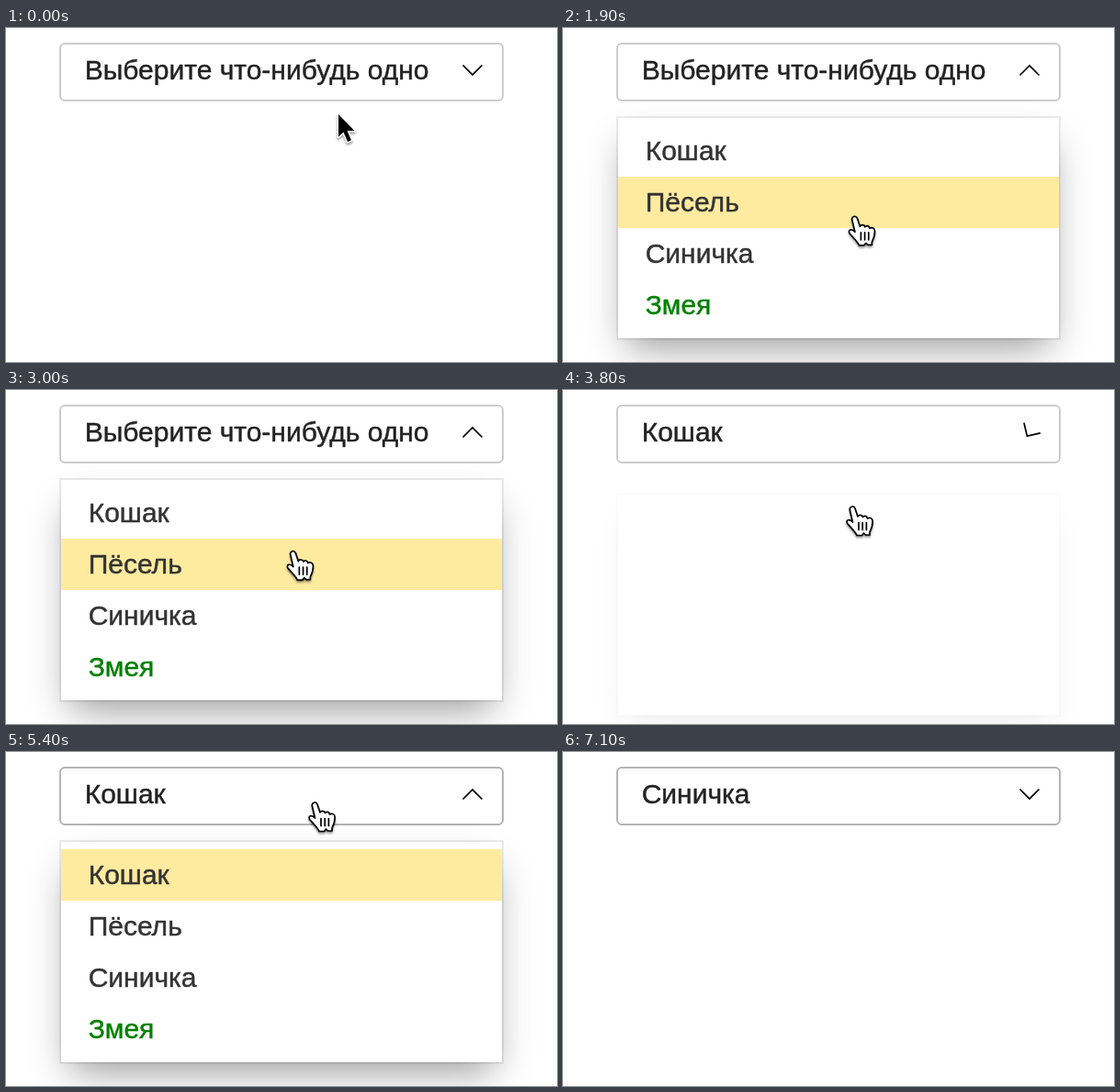
An HTML page for the animation above (8.7 s loop, 600x364 px).

```html
<!DOCTYPE html>
<html lang="ru">
<head>
<meta charset="utf-8">
<title>Выпадающий список</title>
<style>
html, body { margin: 0; width: 100%; height: 100%; overflow: hidden; background: #fff; }
#stage { position: relative; width: 600px; height: 364px; overflow: hidden; background: #fff; }
svg { position: absolute; left: 0; top: 0; overflow: hidden; }
text {
  font: 30px "Liberation Sans", Arial, sans-serif; white-space: pre;
  stroke: currentColor; fill: currentColor; stroke-width: .45px;
}
#menu {
  position: absolute; left: 60px; top: 98px; width: 480px; height: 240px; background: #fff;
  box-shadow: 0 0 0 2px rgba(0,0,0,.08), 0 20px 40px -10px rgba(0,0,0,.4);
}
#cursor { filter: drop-shadow(0 2px 1.2px rgba(0,0,0,.4)); }
</style>
</head>
<body>
<div id="stage">
  <svg width="600" height="364">
    <rect id="field" x="59" y="17" width="482" height="62" rx="5" fill="#fff" stroke-width="2"/>
    <text id="value" x="85.7" y="56" color="#222"></text>
    <polyline id="tick" points="497.5,40.5 508,51 518.5,40.5" fill="none" stroke="#000" stroke-width="1.7"/>
  </svg>
  <div id="menu">
    <svg id="items" width="480" height="240"></svg>
  </div>
  <svg width="600" height="364">
    <g id="cursor">
      <path id="arrow" d="M1 0V24.5L6.5 19.5L11 30L15 28.3L10.6 18H18.5Z"
        fill="#000" stroke="#fff" stroke-width="3" paint-order="stroke" stroke-linejoin="round"/>
      <g id="hand" stroke="#000" stroke-width="1.7" stroke-linejoin="round" stroke-linecap="round">
        <path fill="#fff" d="M-3.6 4C-4.5 0 .5 -1.5 2 2L5 11C6 8.5 10 9 10.5 11.5C12 9.5 15 10 15.5 13
          C17.5 11.5 21 12.5 21 15.5C21.5 20 20 24 18 28V31H13.5L11.5 29L9.5 31.5H4
          C3 28.5 -1 24.5 -6 19C-9 14.5 -4 13 -.5 17Z"/>
        <path fill="none" d="M6 17.5v8M10.2 17.5v8M14.4 17.5v8"/>
      </g>
    </g>
  </svg>
</div>
<script>
const LOOP = 8700, FRAME = 100, ROW = 56, FADE = 160;
const $ = id => document.getElementById(id);
const names = ['Кошак', 'Пёсель', 'Синичка', 'Змея'];

$('items').innerHTML = names.map((name, i) => {
  const color = name === 'Змея' ? '#008000' : '#333';
  return `<rect y="${8 + i * ROW}" width="480" height="${ROW}"/>` +
    `<text x="29.7" y="${46 + i * ROW}" style="color:${color}">${name}</text>`;
}).join('');
$('value').style.color = '#222';
const rows = [...$('items').querySelectorAll('rect')];
const labels = [...$('items').querySelectorAll('text')];

const clamp = v => Math.min(1, Math.max(0, v));
const easeOut = (p, power) => 1 - (1 - clamp(p)) ** power;

// The pointer glides from one stop to the next
const home = { x: 361, y: 94 };
const moves = [
  { start: 0, end: 300, x: 337, y: 56, power: 1.3 },
  { start: 1600, end: 2400, x: 306.5, y: 301, power: 2 },
  { start: 2500, end: 3300, x: 316, y: 127, power: 1.3 },
  { start: 4300, end: 4900, x: 337, y: 55, power: 1.3 }
];

function pointer(t) {
  let { x, y } = home;
  for (const m of moves) {
    const p = easeOut((t - m.start) / (m.end - m.start), m.power);
    x += (m.x - x) * p;
    y += (m.y - y) * p;
  }
  return { x, y };
}

// The menu opens and closes in turn
const toggles = [720, 3720, 5180, 6920];

function popup(t) {
  let open = 0, opening = false;
  toggles.forEach((start, i) => {
    if (t < start) return;
    opening = i % 2 === 0;
    const p = easeOut((t - start) / FADE, 2.5);
    open = opening ? p : 1 - p;
  });
  return { open, opening };
}

// Mouse picks the row first, arrow keys on the second visit
function activeRow(t, y) {
  if (t >= 5200) return t < 6000 ? 0 : t < 6200 ? 1 : 2;
  return Math.floor((y - 106) / ROW);
}

function draw(t) {
  const { x, y } = pointer(t);
  const { open, opening } = popup(t);
  const overField = y < 80;
  const chosen = t < 3800 ? -1 : t < 7000 ? 0 : 2;
  const active = activeRow(t, y);

  $('field').setAttribute('stroke', overField ? '#b3b3b3' : '#ccc');
  $('value').textContent = chosen < 0 ? 'Выберите что-нибудь одно' : names[chosen];
  $('tick').setAttribute('transform', `rotate(${open * 180} 508 46)`);

  $('menu').style.opacity = open;
  $('menu').style.transform = `translateY(${20 * (1 - open)}px)`;
  rows.forEach((row, i) => row.setAttribute('fill',
    !opening ? '#fff' : i === active ? '#ffeba0' : i === chosen ? '#f0f0f0' : '#fff'));
  labels.forEach(label => label.setAttribute('opacity', opening ? 1 : 0));

  const isHand = overField || (t > 900 && t < 4400);
  $('cursor').setAttribute('transform', `translate(${x} ${y})`);
  $('cursor').style.display = t < 6000 ? '' : 'none';
  $('hand').style.display = isHand ? '' : 'none';
  $('arrow').style.display = isHand ? 'none' : '';
}

const start = performance.now();
function tick(now) {
  const t = Math.max(0, now - start) % LOOP;
  draw(Math.floor(t / FRAME) * FRAME);
  requestAnimationFrame(tick);
}
draw(0);
requestAnimationFrame(tick);
</script>
</body>
</html>
```
